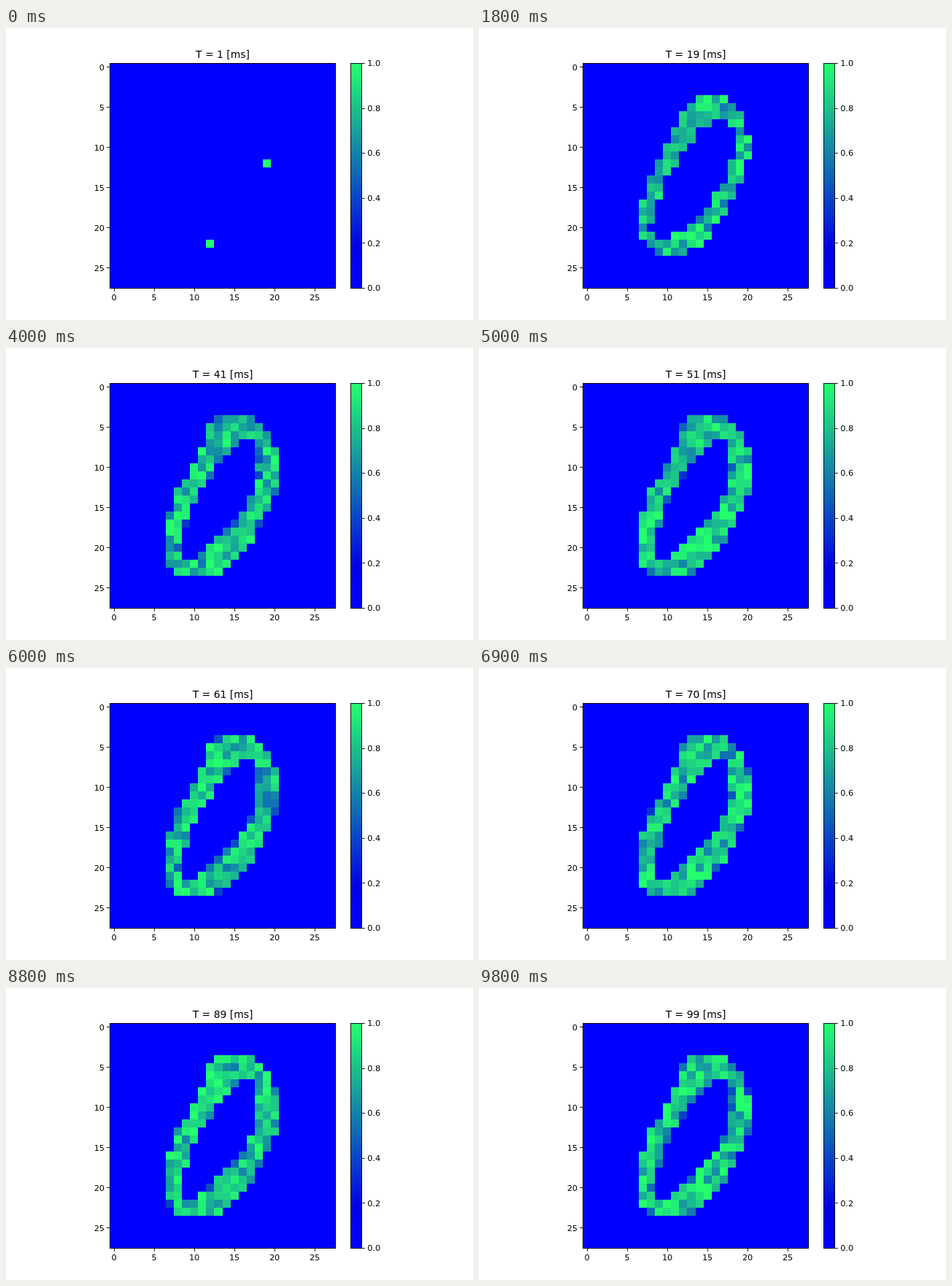
Recreate the animation shown at these times as an HTML page. Size 640 px wide and 400 px high, loop 9900 ms.

```html
<!DOCTYPE html>
<html lang="en">
<head>
<meta charset="utf-8">
<title>Spike traces</title>
<style>
  html, body { margin: 0; width: 100%; height: 100%; overflow: hidden; background: #fff; }
  svg { display: block; width: 640px; height: 400px; }
  text { font-family: "DejaVu Sans", Verdana, sans-serif; font-size: 11.3px; fill: #000; }
  #title { font-size: 13.9px; text-anchor: middle; }
  .mid { text-anchor: middle; }
  .end { text-anchor: end; }
  .line { fill: none; stroke: #000; stroke-width: 0.89; }
  #cells { shape-rendering: crispEdges; }
</style>
</head>
<body>
<svg viewBox="0 0 640 400">
  <defs>
    <linearGradient id="ramp" x1="0" y1="1" x2="0" y2="0">
      <stop offset="0" stop-color="#00f"/>
      <stop offset="0.18" stop-color="rgb(0,0,232)"/>
      <stop offset="1" stop-color="rgb(36,255,110)"/>
    </linearGradient>
  </defs>
  <rect x="142" y="48" width="310" height="309" fill="#00f"/>
  <g id="cells"></g>
  <rect x="472" y="48" width="16" height="309" fill="url(#ramp)"/>
  <rect class="line" x="142.5" y="48.5" width="309" height="308"/>
  <rect class="line" x="472.5" y="48.5" width="15" height="308"/>
  <g id="axes"></g>
  <text id="title" x="297" y="41">T = 1 [ms]</text>
</svg>
<script>
const STEP = 100, STEPS = 99, TAU = 20;
const GRID = 28, LEFT = 142, TOP = 48, CELL_W = 309 / GRID, CELL_H = 11;

const $ = id => document.getElementById(id);

function add(parent, tag, attrs, text) {
  const el = document.createElementNS("http://www.w3.org/2000/svg", tag);
  for (const key in attrs) el.setAttribute(key, attrs[key]);
  if (text !== undefined) el.textContent = text;
  parent.appendChild(el);
  return el;
}

function randomFrom(seed) {
  return () => {
    seed = (seed + 0x6D2B79F5) | 0;
    let t = Math.imul(seed ^ (seed >>> 15), seed | 1);
    t ^= t + Math.imul(t ^ (t >>> 7), t | 61);
    return ((t ^ (t >>> 14)) >>> 0) / 4294967296;
  };
}

// Same ramp as the gradient: blue dims a little, then turns green
function colour(value) {
  const k = (value - 0.18) / 0.82;
  return k < 0
    ? `rgb(0,0,${Math.round(255 - 23 * value / 0.18)})`
    : `rgb(${Math.round(36 * k)},${Math.round(255 * k)},${Math.round(232 - 122 * k)})`;
}

function drawAxes() {
  const axes = $("axes");
  const tick = d => add(axes, "path", { class: "line", d });
  for (let n = 0; n < GRID; n += 5) {
    const x = 148.5 + n * 11, y = 53.5 + n * 11;
    tick(`M${x} 357v3.9`);
    tick(`M142 ${y}h-3.9`);
    add(axes, "text", { class: "mid", x: x - 0.4, y: 373 }, n);
    add(axes, "text", { class: "end", x: 135, y: Math.round(y + 4.2) }, n);
  }
  for (let n = 0; n <= 5; n++) {
    const y = 356 - n * 61.6;
    tick(`M488 ${Math.round(y) + 0.5}h3.9`);
    add(axes, "text", { x: 495.2, y: Math.round(y + 4.2) }, (n / 5).toFixed(1));
  }
}

// Left and right edge of the slanted oval in a row
function oval(row) {
  const u = (row - 13.5) / 10;
  const mid = 14.3 - 4.05 * u - 1.1 * u ** 2 + 1.8 * u ** 3;
  const half = 5.9 * Math.sqrt(Math.max(0, 1 - 0.925 * u * u)) + 0.9 * u * (1 - u * u);
  return [mid - half, mid + half];
}

function hole(row) {
  const d = row - 14;
  const mid = 14 - 0.5 * d - 0.014 * d * d;
  const half = 3.3 * Math.sqrt(Math.max(0, 1 - (d / 7.3) ** 2));
  return [mid - half, mid + half];
}

const overlap = (col, [a, b]) => Math.max(0, Math.min(b, col + 1) - Math.max(a, col));

// Cells on the rim wake later and fire less often
function spikeTimes(first, gap, random) {
  const times = [];
  for (let t = first; t <= STEPS; t += 1 + Math.floor(random() * gap)) times.push(t);
  return times;
}

function makeCells() {
  const random = randomFrom(28);
  const cells = [];
  for (let row = 4; row < 24; row++) {
    for (let col = 0; col < GRID; col++) {
      const cover = overlap(col, oval(row)) - overlap(col, hole(row));
      if (cover < 0.33) continue;
      const strong = cover > 0.72;
      const leads = (col === 19 && row === 12) || (col === 12 && row === 22);
      const first = leads ? 1 : Math.floor(strong ? 2 + random() * 13 : 20 + random() * 20);
      const x = Math.round(LEFT + col * CELL_W);
      const el = add($("cells"), "rect", {
        x, y: TOP + row * CELL_H,
        width: Math.round(LEFT + (col + 1) * CELL_W) - x, height: CELL_H
      });
      cells.push({ el, times: spikeTimes(first, strong ? 13 : 24, random) });
    }
  }
  return cells;
}

drawAxes();
const cells = makeCells();
const begin = performance.now();
let shown = 0;

function show(T) {
  $("title").textContent = `T = ${T} [ms]`;
  for (const { el, times } of cells) {
    let last = -Infinity;
    for (const t of times) if (t <= T) last = t;
    el.setAttribute("fill", colour(Math.exp((last - T) / TAU)));
  }
}

function tick() {
  const T = Math.floor((performance.now() - begin) / STEP) % STEPS + 1;
  if (T !== shown) show(shown = T);
  requestAnimationFrame(tick);
}

tick();
</script>
</body>
</html>
```
